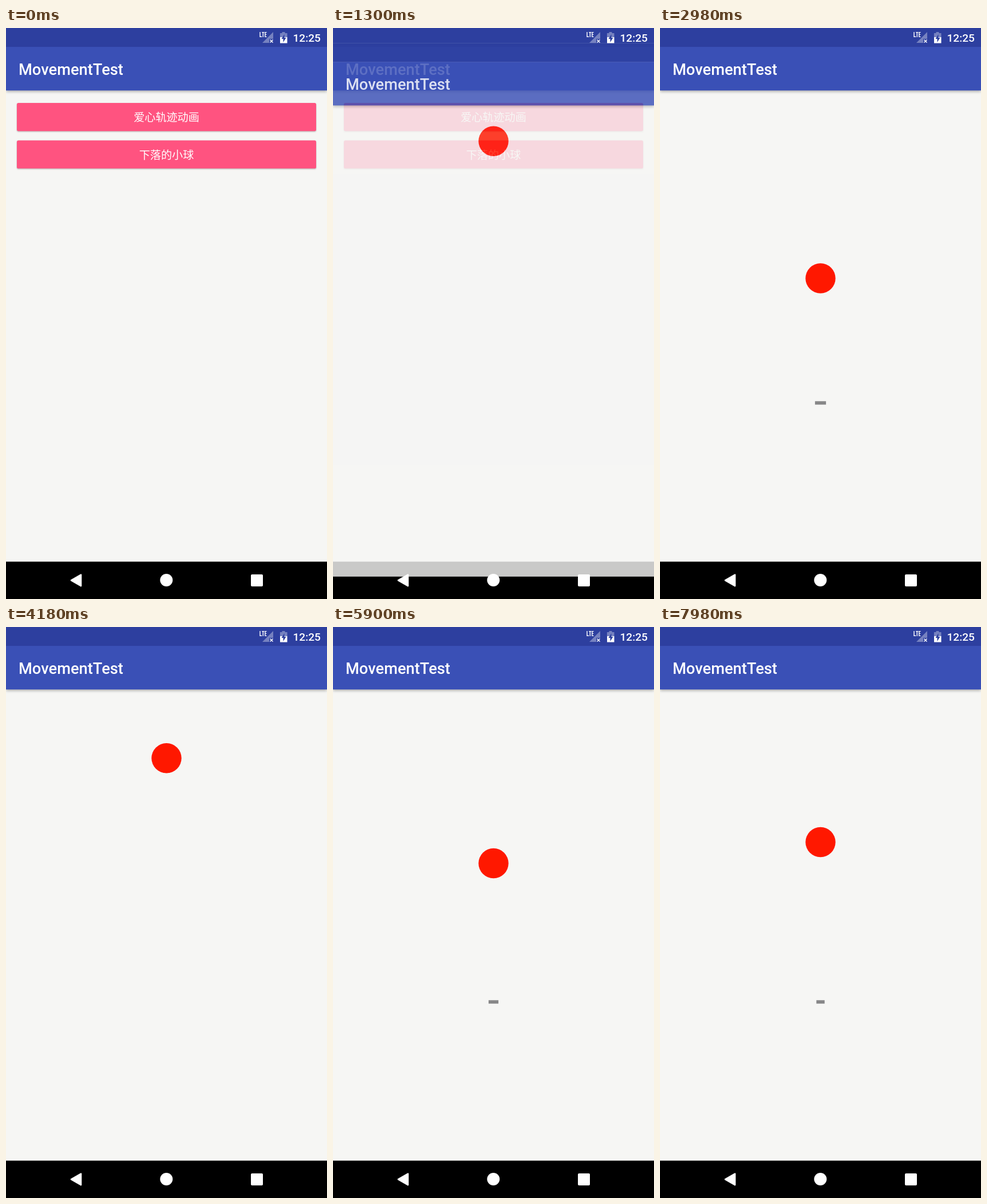
Animation, 561 px wide and 998 px high, one loop 8 s. Source, as an HTML page:

```html
<!DOCTYPE html>
<html lang="zh">
<head>
<meta charset="utf-8">
<title>Falling ball</title>
<style>
  html, body { margin: 0; width: 100%; height: 100%; overflow: hidden; background: #000; }
  svg { display: block; width: 561px; height: 998px; }
  text { fill: #fff; font-family: Roboto, "Noto Sans", sans-serif; font-weight: 500; }
  .label { font: 19.1px "Noto Sans CJK SC", "Noto Sans CJK", sans-serif; text-anchor: middle; }
  .raised { filter: drop-shadow(0 1.3px 1.3px rgba(0, 0, 0, .28)); }
  .bar { filter: drop-shadow(0 2px 2.5px rgba(0, 0, 0, .3)); }
</style>
</head>
<body>
<svg viewBox="0 0 561 998">
  <defs>
    <g id="frame">
      <rect width="561" height="998" fill="#f6f6f4"/>
      <rect class="bar" y="33" width="561" height="76.2" fill="#3a50b6"/>
      <rect width="561" height="33" fill="#2d3f9f"/>
      <text x="22" y="81.5" font-size="27.27">MovementTest</text>
      <rect y="932.7" width="561" height="66"/>
    </g>
    <rect id="button" x="19" width="523" height="49.2" rx="2.7"/>
    <clipPath id="clip"><use href="#button" y="196.4"/></clipPath>
  </defs>

  <g id="menu">
    <use href="#frame"/>
    <use class="raised" href="#button" y="131" fill="#ff5380"/>
    <text class="label" x="280.5" y="163.3">爱心轨迹动画</text>
    <use id="pressed" class="raised" href="#button" y="196.4" fill="#ff5380"/>
    <circle id="ripple" cx="280.5" cy="221" clip-path="url(#clip)"/>
    <text class="label" x="280.5" y="228.7">下落的小球</text>
  </g>

  <g id="scene">
    <use href="#frame"/>
    <rect id="shade" y="652.3" height="6" fill="#878788"/>
    <circle id="ball" cx="280.5" r="26.2" fill="#ff1800"/>
  </g>

  <!-- system icons stay above both windows -->
  <g fill="#fff">
    <path d="M444 7v8.2h3.2M447.2 7.6h4.2M449.3 7.6v8.4M455.6 7.6h-2.8v7.8h2.8M452.8 11.4h2.5" fill="none" stroke="#fff" stroke-width="1.4"/>
    <path d="M467 7v12h-7v7h-12z" opacity=".35"/>
    <path d="M461.5 20.5l5 5m0-5l-5 5" stroke="#fff" stroke-width="1.5"/>
    <path d="M482.5 7h5v2h4v7h-12.6v-7h3.6z" opacity=".35"/>
    <path d="M479 16h12.5v10.5h-12.5z"/>
    <path d="M486.5 11l-5 8h3v6l5-8h-3z" fill="#2d3f9f"/>
    <text x="501.5" y="23.8" font-size="19.1">12:25</text>
    <path d="M114 965.4l17-9.7v19.4z" stroke="#fff" stroke-width="2.6" stroke-linejoin="round"/>
    <circle cx="280.3" cy="965" r="11"/>
    <rect x="428" y="955" width="21" height="21" rx="2"/>
  </g>
</svg>
<script>
const LOOP = 8000, OPEN = 1231, DROP = 2398, FALL = 1012.2;
const $ = id => document.getElementById(id);
const set = (id, attrs) => {
  for (const name in attrs) $(id).setAttribute(name, attrs[name]);
};
const ramp = (t, start, length) => Math.min(1, Math.max(0, (t - start) / length));
const easeOut = (x, power) => 1 - (1 - x) ** power;

function press(t) {
  const grow = easeOut(ramp(t, 500, 280), 2);
  const hold = ramp(t, 500, 100) * (1 - ramp(t, 980, 250));
  set("ripple", { r: 270 * grow, opacity: 0.12 * hold });
  $("pressed").style.filter =
    `drop-shadow(0 ${1.3 + 2 * hold}px ${1.3 + 2 * hold}px rgba(0,0,0,.28))`;
}

function openScene(t) {
  const slide = 79.84 * (1 - easeOut(ramp(t, OPEN, 350), 5));
  set("scene", {
    opacity: easeOut(ramp(t, OPEN, 200), 4),
    transform: `translate(0 ${slide})`
  });
}

function bounce(t) {
  const phase = Math.max(0, t - DROP) / FALL;
  const p = (1 - Math.cos(Math.PI * phase)) / 2;
  const width = p < 0.2 ? 0 : 30 * p + 20 * p ** 7;
  set("ball", { cy: 171.6 + 430 * p });
  set("shade", { x: 280.5 - width / 2, width });
}

function draw(now) {
  const t = now % LOOP;
  press(t);
  openScene(t);
  bounce(t);
  requestAnimationFrame(draw);
}
draw(0);
</script>
</body>
</html>
```
